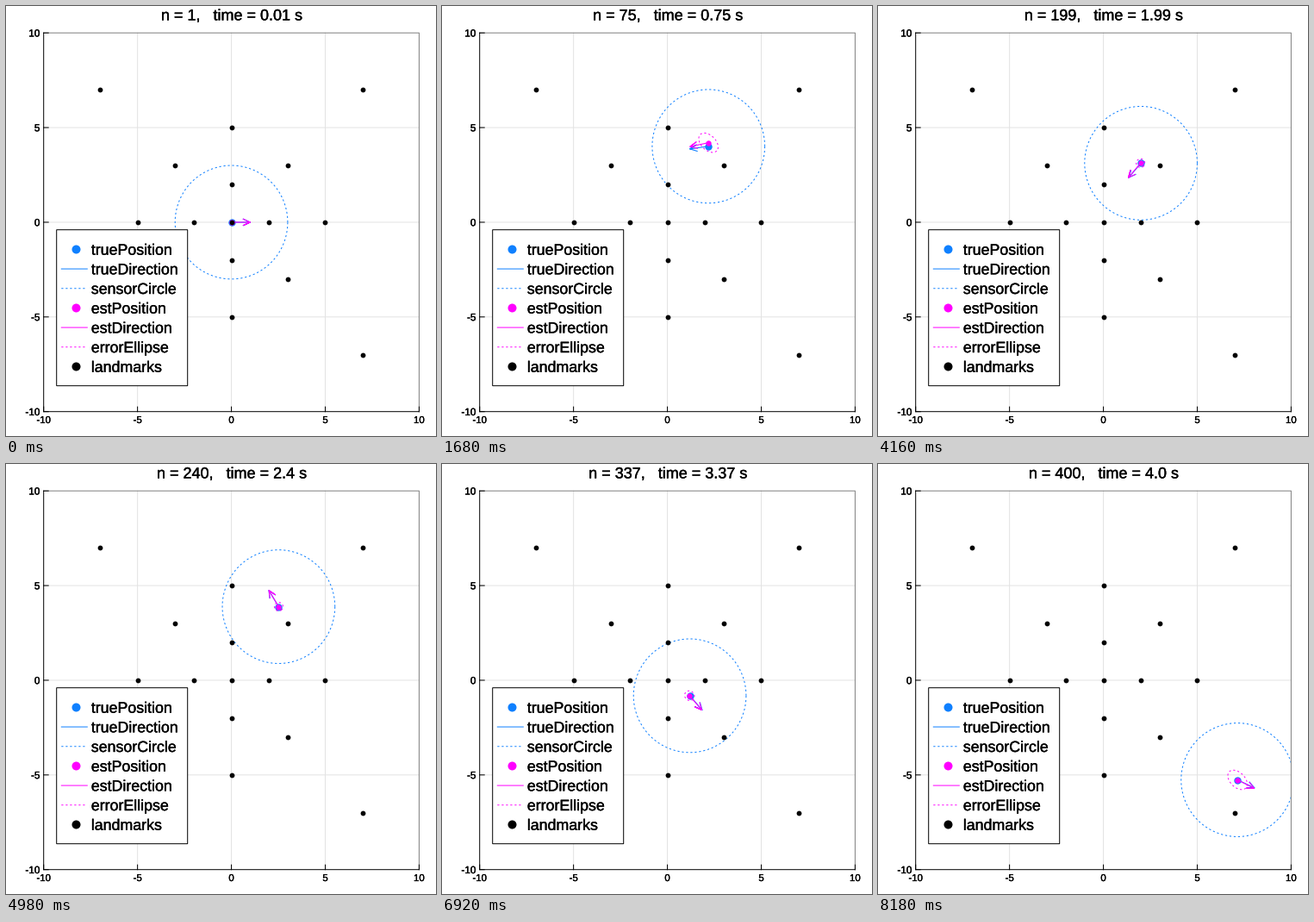
A matplotlib script that plays this animation: 499 px wide and 499 px high, repeating every 8.54 s.

```python
import numpy as np
import matplotlib.pyplot as plt
from matplotlib import patheffects
from matplotlib.animation import FuncAnimation
from matplotlib.patches import Rectangle

SIZE, DPI = 499, 128
PX = 72 / DPI
BLUE, PINK, BLACK = "#0f80ff", "#ff00ff", "#000000"
LEFT, RIGHT, TOP, BOTTOM = 43.7, 479.4, 31.2, 470.7
DOTS = (0, (2.2, 2.8))
STEPS, HOLD, FRAMES, INTERVAL = 400, 9, 427, 20
SENSOR_RANGE = 3

# step, x, y, heading in degrees
POSES = np.array([
    (1, 0, 0, 0), (44, 2.665, .855, 35), (75, 2.19, 4.01, 188),
    (129, 2.03, 3.14, 489.5), (199, 2.0, 3.12, 949.5), (279, .035, .968, 1370.5),
    (337, 1.195, -.815, 1391), (400, 7.14, -5.26, 1415),
])


def to_px(x, y):
    """Plot units to stage pixels, y down."""
    return (LEFT + (x + 10) * (RIGHT - LEFT) / 20,
            BOTTOM - (y + 10) * (BOTTOM - TOP) / 20)


def bump(n, peak, rise, fall):
    """Bell of height 1 with its own width on each side."""
    return np.exp(-.5 * ((n - peak) / np.where(n < peak, rise, fall)) ** 2)


def smooth(n, t, p):
    """Cubic curve through values p at times t."""
    m = np.gradient(p, t)
    i = np.clip(np.searchsorted(t, n, side="right") - 1, 0, len(t) - 2)
    d = t[i + 1] - t[i]
    s = (n - t[i]) / d
    return ((2 * s**3 - 3 * s**2 + 1) * p[i] + (s**3 - 2 * s**2 + s) * d * m[i]
            + (3 * s**2 - 2 * s**3) * p[i + 1] + (s**3 - s**2) * d * m[i + 1])


def drive(step_sizes, key, path):
    """Add up the steps, then spread the miss at each pose over the way there."""
    raw = np.concatenate([[0], np.cumsum(step_sizes)])
    at = POSES[:, 0].astype(int) - 1
    return raw + np.interp(path, path[at], key - raw[at])


# the robot speeds up three times and spins on the spot in between
n = np.arange(1, STEPS + 1)
true_h = smooth(n, POSES[:, 0], POSES[:, 3])
speed = (.168 * bump(n, 51, 20, 23) + .175 * bump(n, 268, 25, 15)
         + .158 * bump(n, 367, 22, 22))
mid_speed = (speed[1:] + speed[:-1]) / 2
mid_h = np.radians((true_h[1:] + true_h[:-1]) / 2)
path = np.concatenate([[0], np.cumsum(mid_speed)])
true_x = drive(mid_speed * np.cos(mid_h), POSES[:, 1], path)
true_y = drive(mid_speed * np.sin(mid_h), POSES[:, 2], path)

# the estimate is poor twice, after fast stretches with few landmarks
lost_once, lost_again = bump(n, 75, 20, 15), bump(n, 400, 30, 30)
est_x = true_x - .02 * np.sin(n / 25)
est_y = true_y + .19 * lost_once
est_h = true_h + 3.8 * lost_once - 2 * lost_again
base = 5 * (1 - np.exp(-(n - 1) / 15))
axis_a = base + 8.5 * (lost_once + lost_again)
axis_b = base + 3.5 * (lost_once + lost_again)

fig = plt.figure(figsize=(SIZE / DPI, SIZE / DPI), dpi=DPI, facecolor="white")
ax = fig.add_axes([0, 0, 1, 1])
ax.set_xlim(0, SIZE)
ax.set_ylim(SIZE, 0)
ax.axis("off")
window = Rectangle((LEFT, TOP), RIGHT - LEFT, BOTTOM - TOP, fc="none", ec="none")
ax.add_patch(window)
HEAVIER = [patheffects.withStroke(linewidth=.35 * PX, foreground=BLACK)]


def line(x, y, color, width=1.0, z=1, style="-", clip=False):
    item, = ax.plot(x, y, color=color, lw=width * PX, ls=style, zorder=z, snap=False)
    if clip:
        item.set_clip_path(window)
    return item


def dots(x, y, color, radius, z):
    item, = ax.plot(x, y, ls="none", marker="o", color=color, mew=0,
                    ms=2 * radius * PX, zorder=z, snap=False)
    return item


def label(x, y, text, size, align, z=2):
    return ax.text(x, y, text, fontsize=size * PX, family="Liberation Sans",
                   ha=align, va="baseline", color=BLACK, zorder=z,
                   path_effects=HEAVIER)


# grid, frame and ticks
for v in (-5, 0, 5):
    gx, gy = to_px(v, v)
    line([gx, gx], [TOP, BOTTOM], "#e3e3e3", z=0)
    line([LEFT, RIGHT], [gy, gy], "#e3e3e3", z=0)
line([LEFT, RIGHT, RIGHT], [TOP, TOP, BOTTOM], "#808080")
line([LEFT, LEFT, RIGHT], [TOP, BOTTOM, BOTTOM], BLACK)
for v in range(-10, 11, 5):
    tx, ty = to_px(v, v)
    line([LEFT, LEFT + 5.5], [ty, ty], BLACK)
    line([tx, tx], [BOTTOM, BOTTOM - 5.5], BLACK)
    label(39.5, ty + 4.3, str(v), 11.8, "right")
    label(tx, 484, str(v), 11.4, "center")

landmarks = [(0, 0)]
for r in (2, 5):
    landmarks += [(r, 0), (-r, 0), (0, r), (0, -r)]
for r in (3, 7):
    landmarks += [(-r, r), (r, r), (r, -r)]

# moving parts
title = label(262, 16.5, "", 18, "center")
true_dot = dots([], [], BLUE, 4.2, 3)
true_arrow = line([], [], BLUE, 1.1, 4, clip=True)
sensor = line([], [], BLUE, 1.0, 5, DOTS, clip=True)
est_dot = dots([], [], PINK, 3.2, 6)
est_arrow = line([], [], PINK, 1.1, 7, clip=True)
ellipse = line([], [], PINK, 1.0, 8, DOTS, clip=True)
dots(*to_px(*np.array(landmarks).T), BLACK, 2.9, 9)

# legend
ax.add_patch(Rectangle((58.7, 259.7), 152, 181, fc="white", ec=BLACK, lw=PX,
                       zorder=10, snap=False))
ENTRIES = [
    ("truePosition", "dot", BLUE), ("trueDirection", "-", BLUE),
    ("sensorCircle", DOTS, BLUE), ("estPosition", "dot", PINK),
    ("estDirection", "-", PINK), ("errorEllipse", DOTS, PINK),
    ("landmarks", "dot", BLACK),
]
for i, (name, kind, color) in enumerate(ENTRIES):
    y = 282.4 + 22.67 * i
    if kind == "dot":
        dots([81.3], [y], color, 5, 11)
    else:
        line([64.3, 94.3], [y, y], color, z=11, style=kind)
    label(98.8, y + 6.3, name, 17.8, "left", 11)

ring = np.linspace(0, 2 * np.pi, 181)
ring_cos, ring_sin = np.cos(ring), np.sin(ring)


def arrow(x, y, heading):
    """Shaft one unit long with an open head, as one stroke."""
    a = np.radians(heading)
    x0, y0 = to_px(x, y)
    x1, y1 = to_px(x + np.cos(a), y + np.sin(a))
    ux, uy = np.cos(a), -np.sin(a)
    bx, by = x1 - 8 * ux, y1 - 8 * uy
    wx, wy = -3.7 * uy, 3.7 * ux
    return [x0, x1, bx + wx, x1, bx - wx], [y0, y1, by + wy, y1, by - wy]


def draw(frame):
    step = min(max(frame - HOLD, 1), STEPS)
    i = step - 1
    title.set_text(f"n = {step},   time = {step / 100} s")
    x, y = true_x[i], true_y[i]
    cx, cy = to_px(x, y)
    true_dot.set_data([cx], [cy])
    true_arrow.set_data(*arrow(x, y, true_h[i]))
    sensor.set_data(*to_px(x + SENSOR_RANGE * ring_cos, y + SENSOR_RANGE * ring_sin))

    ex, ey = to_px(est_x[i], est_y[i])
    est_dot.set_data([ex], [ey])
    est_arrow.set_data(*arrow(est_x[i], est_y[i], est_h[i]))
    # long axis points down and to the right
    u, v = axis_a[i] * ring_cos, axis_b[i] * ring_sin
    ellipse.set_data(ex + (u - v) / np.sqrt(2), ey + (u + v) / np.sqrt(2))
    return title, true_dot, true_arrow, sensor, est_dot, est_arrow, ellipse


anim = FuncAnimation(fig, draw, frames=FRAMES, interval=INTERVAL,
                     repeat=True, repeat_delay=0, blit=False)
plt.show()
```
